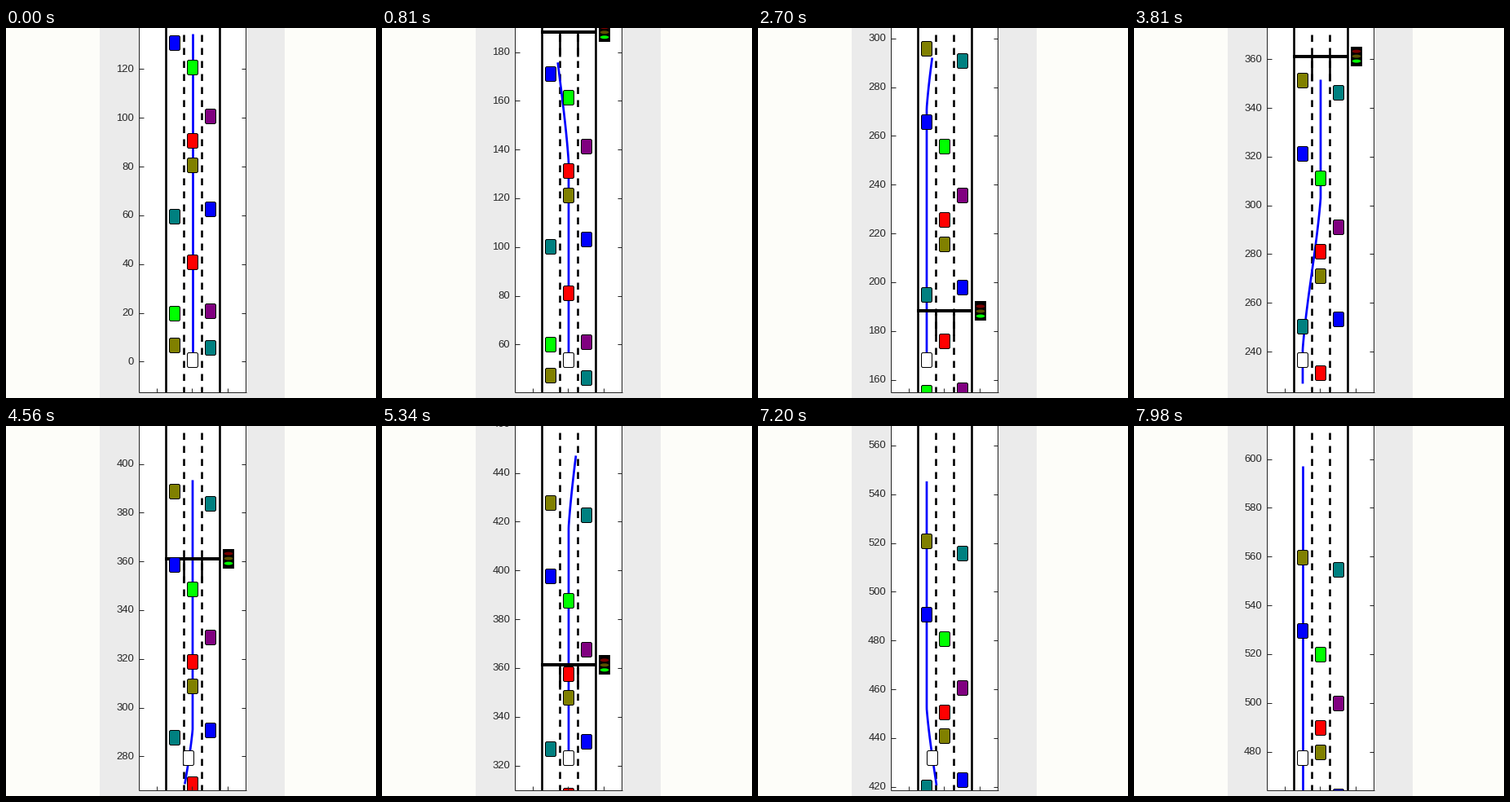
A matplotlib script for the animation above (8 s loop, 454 by 454 pixels).

```python
import numpy as np
import matplotlib.pyplot as plt
from matplotlib.animation import FuncAnimation
from matplotlib.patches import Ellipse, FancyBboxPatch, Rectangle

SIZE, DPI = 454, 100
PX = 72 / DPI                # points per pixel
SCALE = 2.991                # pixels per metre
EGO_Y, ORIGIN_Y = 407, 409.4
LEFT, MID, RIGHT = 207, 229, 251
CAR_W, CAR_H = 13, 18
X0, X1, BOTTOM = 163, 294, 447
INK = (0.15, 0.15, 0.15)
STEP, TICK, COUNT = 30, 20, 400   # ms per simulation step, ms per frame, frames

GREEN, RED, BLUE = "#00ff00", "#ff0000", "#0000ff"
OLIVE, TEAL, PURPLE = "#808000", "#008080", "#800080"
CARS = [
    (LEFT, 160, OLIVE), (LEFT, 130, BLUE), (LEFT, 59, TEAL), (LEFT, 19, GREEN),
    (LEFT, 6, OLIVE), (MID, 120, GREEN), (MID, 90, RED), (MID, 80, OLIVE),
    (MID, 40, RED), (RIGHT, 155, TEAL), (RIGHT, 100, PURPLE), (RIGHT, 62, BLUE),
    (RIGHT, 20, PURPLE), (RIGHT, 5, TEAL),
]
CAR_SPEED = 1.5              # metres per step
STOPS = (188.1, 361.2)

# lane changes: begin, drift while pending, length, sideways shift
CHANGES = [(112, 0.5, 69, -22), (241, 0.52, 62, 22), (394, 0.42, 70, -22)]

KEY_STEP = np.array([0, 52, 90, 127, 178, 214, 266.0])
KEY_POS = np.array([0, 100.7, 167.4, 235.9, 322.4, 385.55, 476.7])
KEY_VEL = np.gradient(KEY_POS, KEY_STEP)


def ego_pos(n):
    """Cubic Hermite travel of the ego car."""
    i = min(np.searchsorted(KEY_STEP, n, side="right") - 1, len(KEY_STEP) - 2)
    h = KEY_STEP[i + 1] - KEY_STEP[i]
    t = (n - KEY_STEP[i]) / h
    return ((2 * t**3 - 3 * t**2 + 1) * KEY_POS[i]
            + (t**3 - 2 * t**2 + t) * h * KEY_VEL[i]
            + (3 * t**2 - 2 * t**3) * KEY_POS[i + 1]
            + (t**3 - t**2) * h * KEY_VEL[i + 1])


def plan_step(n):
    return 0 if n < 10 else min(10 + 8 * ((n - 10) // 8), 258)


def plan_x(v, p):
    """Lateral pixel position at v of the plan made at p."""
    x = np.full_like(v, MID, dtype=float)
    for begin, drift, length, shift in CHANGES:
        start = begin + drift * max(0, begin - 15 - p)
        if p >= begin:
            length -= 12
        if begin == 394 and p < 350:
            shift = -shift
        t = np.clip((v - start) / length, 0, 1)
        x += shift * (0.65 * t + 0.35 * t * t * (3 - 2 * t))
    return x


fig = plt.figure(figsize=(SIZE / DPI, SIZE / DPI), dpi=DPI, facecolor="#fdfdf9")
ax = fig.add_axes([0, 0, 1, 1])
ax.set_xlim(0, SIZE)
ax.set_ylim(SIZE, 0)
ax.axis("off")


def box(x, y, w, h, color, z):
    return ax.add_patch(Rectangle((x, y), w, h, fc=color, ec="none", zorder=z))


box(115, -1, 227, SIZE + 2, "#ebebeb", 0)
view = box(X0, -1, X1 - X0, BOTTOM + 1, "white", 1)


def line(xs, ys, width, color="black", z=2, clip=True, **kw):
    art, = ax.plot(xs, ys, color=color, lw=width * PX, zorder=z,
                   solid_capstyle="butt", dash_capstyle="butt", **kw)
    if clip:
        art.set_clip_path(view)
    return art


for x in (196, 262):
    line([x, x], [-1, BOTTOM], 2.6)
for x in (218, 240):
    line([x, x], [8, BOTTOM], 2.6, ls=(0, (8.5 / 2.6, 7.5 / 2.6)))

# axes frame
line([X0, X0], [-1, BOTTOM], 1, INK, 9, False)
line([X1, X1], [-1, BOTTOM], 1, INK, 9, False)
line([X0, X1 + 1], [BOTTOM, BOTTOM], 1, INK, 9, False)
for x in (185, 228, 272):
    line([x, x], [BOTTOM - 5, BOTTOM], 1, INK, 9, False)

path = line([], [], 2.7, BLUE, 3)

signals = []
for v in STOPS:
    bar = line([195, 263], [0, 0], 4, z=4)
    guides = [line([x, x], [0, 0], 2.6, z=4) for x in (218, 240)]
    case = box(266, 0, 14, 24, "black", 5)
    case.set_clip_path(view)
    lamps = []
    for dy, color in ((-6, "#780000"), (0, "#5a5000"), (6, GREEN)):
        lamp = ax.add_patch(Ellipse((273, 0), 10.5, 4, fc=color, ec="none", zorder=6))
        lamp.set_clip_path(view)
        lamps.append((lamp, dy))
    signals.append((v, bar, guides, case, lamps))


def make_car(x, color, z):
    car = FancyBboxPatch((x - 7, 0), CAR_W, CAR_H, fc=color, ec="black", lw=PX,
                         boxstyle="round,pad=0,rounding_size=2",
                         snap=True, zorder=z)
    ax.add_patch(car)
    car.set_clip_path(view)
    return car


cars = [(make_car(x, c, 7), v) for x, v, c in CARS]
ego = make_car(MID, "white", 8)

ticks = []
for v in range(0, 661, 20):
    marks = [line([X0, X0 + 6], [0, 0], 1, INK, 9, False),
             line([X1 - 5, X1], [0, 0], 1, INK, 9, False)]
    label = ax.text(157, 0, str(v), ha="right", va="center", color=INK,
                    family="Liberation Sans", size=13 * PX, zorder=9)
    ticks.append((v, marks, label))


def draw(k):
    n = (k * TICK + 10) // STEP
    p = ego_pos(n)

    def to_y(v):
        return ORIGIN_Y - (v - p) * SCALE

    for v, marks, label in ticks:
        y = to_y(v)
        seen = -12 < y <= BOTTOM
        for m in marks:
            m.set_ydata([y, y])
            m.set_visible(seen)
        label.set_y(y + 0.5)
        label.set_visible(seen)

    for v, bar, guides, case, lamps in signals:
        y = to_y(v)
        bar.set_ydata([y, y])
        for g in guides:
            g.set_ydata([y, y + 10 * SCALE])
        case.set_y(y - 12)
        for lamp, dy in lamps:
            lamp.set_center((273, y + dy))

    for car, v in cars:
        car.set_y(EGO_Y - (v + CAR_SPEED * n - p) * SCALE - CAR_H / 2)

    start = ego_pos(plan_step(n))
    vs = start + np.linspace(0, 134.6, 109)
    xs = plan_x(vs, start)
    if np.ptp(xs) > 0.01:
        vs = start + np.linspace(0, 124.7, 101)
        xs = plan_x(vs, start)
    path.set_data(xs, to_y(vs))

    ego.set_x(plan_x(np.array([p]), start)[0] - 7)
    ego.set_y(EGO_Y - CAR_H / 2)
    return []


anim = FuncAnimation(fig, draw, frames=COUNT, interval=TICK, repeat=True,
                     repeat_delay=0, blit=False, cache_frame_data=False)
plt.show()
```
